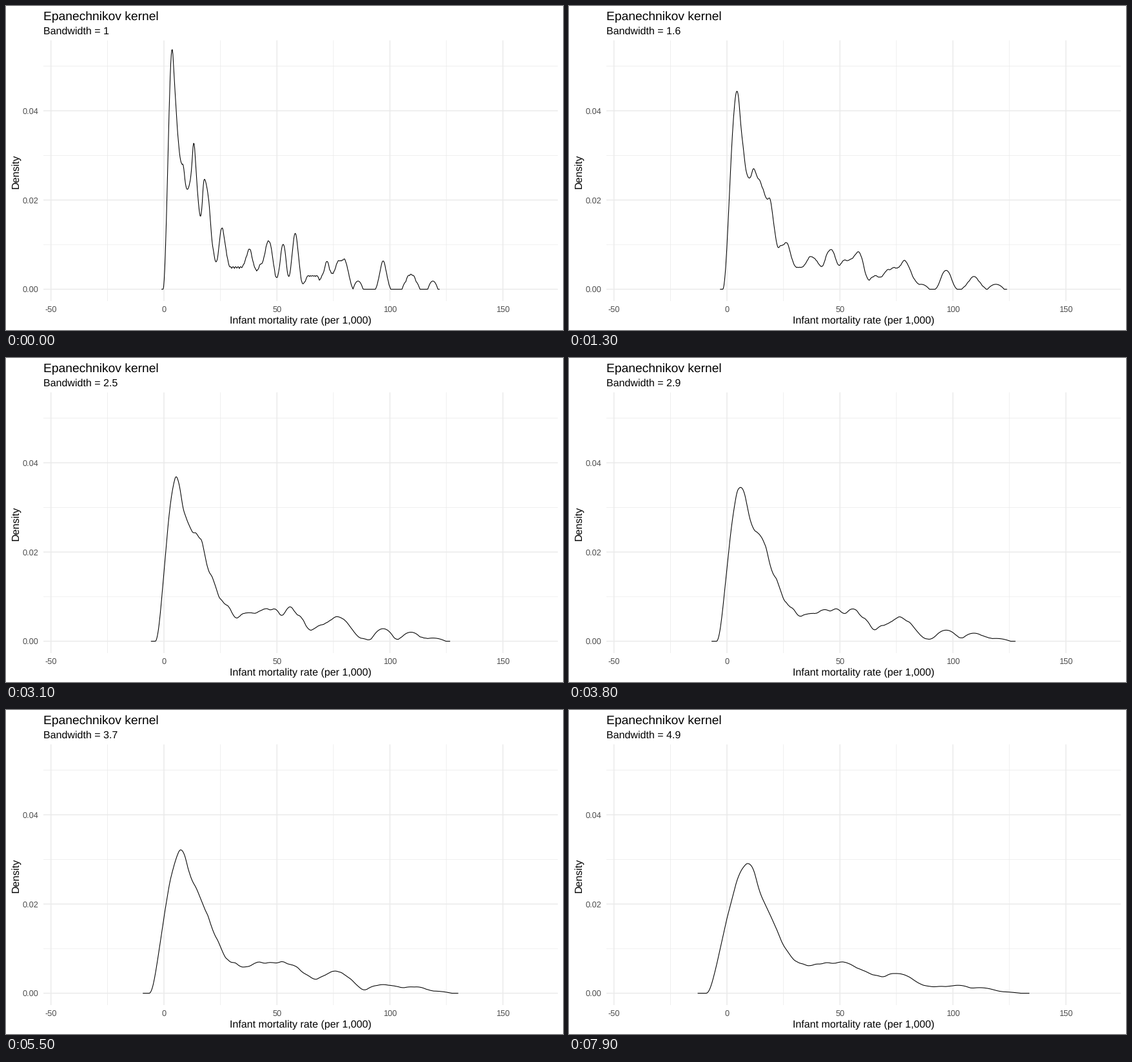
Recreate the animation shown at these times as a matplotlib script. Size 864x504 px, loop 8000 ms.

```python
import numpy as np
import matplotlib.pyplot as plt
from matplotlib.animation import FuncAnimation

W, H = 864, 504
FRAMES, INTERVAL = 80, 100

plt.rcParams["font.family"] = "Liberation Sans"
plt.rcParams["text.hinting"] = "none"
plt.rcParams["path.snap"] = False

# Panel edges and data-to-pixel scales
LEFT, RIGHT, TOP, BOTTOM = 58, 856, 53.5, 459
X0, X_SCALE = 245.0, 3.505
Y0, Y_SCALE = 440.6, 6940

# Runs of evenly spaced rates: first, last, how many
RUNS = [(1.9, 4.7, 23), (2, 4, 8), (4.7, 7, 15), (7, 10.3, 15), (9.5, 10.3, 3),
        (11.6, 14.8, 22), (16, 19.3, 13), (18.2, 19.2, 4), (20.2, 21.8, 6),
        (24.1, 27, 9), (27.8, 35.6, 8), (36.6, 39.4, 6),
        (41.3, 49, 9), (45.6, 47, 3), (51.8, 53.7, 6), (56.8, 59.4, 8),
        (63, 68.5, 4), (71, 73.3, 4), (75.6, 77.2, 3), (78.2, 81.4, 5),
        (85.9, 85.9, 1), (95.9, 98.1, 4), (107.6, 111, 3), (119, 119, 1)]
RATES = np.concatenate([np.linspace(*run) for run in RUNS])


def px(x):
    return X0 + X_SCALE * np.asarray(x)


def py(y):
    return Y0 - Y_SCALE * np.asarray(y)


def density(bw):
    """Epanechnikov estimate; bw is the kernel's standard deviation."""
    half = np.sqrt(5) * bw
    x = np.linspace(RATES.min() - 3 * bw, RATES.max() + 3 * bw, 512)
    u = (x[:, None] - RATES) / half
    k = 0.75 * np.clip(1 - u ** 2, 0, None) / half
    return x, k.mean(axis=1)


fig = plt.figure(figsize=(W / 72, H / 72), dpi=72, facecolor="white")
ax = fig.add_axes([0, 0, 1, 1])
ax.set_xlim(0, W)
ax.set_ylim(H, 0)
ax.axis("off")


def grid(xs, ys, width):
    style = dict(color="#EBEBEB", lw=width, solid_capstyle="butt")
    for y in py(ys):
        ax.plot([LEFT, RIGHT], [y, y], **style)
    for x in px(xs):
        ax.plot([x, x], [TOP, BOTTOM], **style)


def label(x, y, s, size=16, color="black", ha="left", **kw):
    return ax.text(x, y, s, size=size, color=color, ha=ha, va="baseline", **kw)


x_ticks = np.arange(-50, 151, 50)
y_ticks = np.arange(3) * 0.02
grid(x_ticks[:-1] + 25, y_ticks + 0.01, 0.78)
grid(x_ticks, y_ticks, 1.55)

for t in x_ticks:
    label(px(t), 475.6, f"{t}", 12.8, "#4D4D4D", "center")
for t in y_ticks:
    label(50.6, py(t) + 4.6, f"{t:.2f}", 12.8, "#4D4D4D", "right")

label(58, 22, "Epanechnikov kernel", 19.2)
subtitle = label(58, 44, "")
label(457, 494, "Infant mortality rate (per 1,000)", ha="center")
label(19.6, 257, "Density", ha="center", rotation=90, rotation_mode="anchor")

curve, = ax.plot([], [], color="black", lw=1.07, solid_capstyle="butt")


def update(i):
    x, y = density(1 + i / 20)
    curve.set_data(px(x), py(y))
    subtitle.set_text(f"Bandwidth = {1 + i // 2 / 10:g}")
    return curve, subtitle


anim = FuncAnimation(fig, update, frames=FRAMES, interval=INTERVAL,
                     repeat=True, repeat_delay=0)
plt.show()
```
